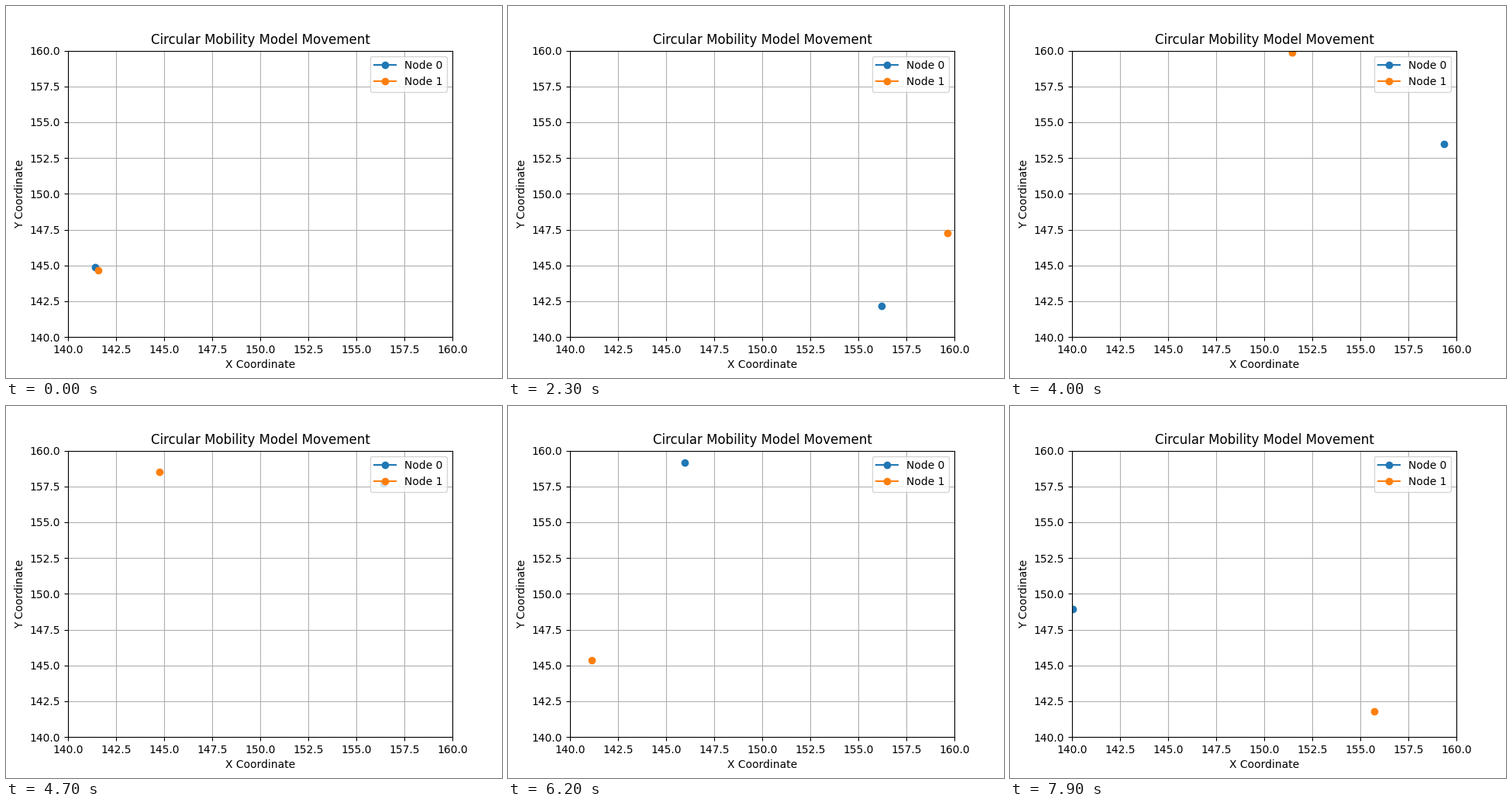
Animation of 640 by 480 pixels, one loop 8 s. Source, as a matplotlib script:

```python
import numpy as np
import matplotlib.pyplot as plt
from matplotlib.animation import FuncAnimation

FRAMES, INTERVAL = 80, 100
CENTER, RADIUS = 150, 10
START = np.radians([210.83, 212.42])
STEP = [np.radians(4.243), 0.1]  # radians per frame for each node

fig, ax = plt.subplots(figsize=(6.4, 4.8), dpi=100)
ax.set(xlim=(140, 160), ylim=(140, 160),
       xlabel="X Coordinate", ylabel="Y Coordinate",
       title="Circular Mobility Model Movement")
ax.grid(True)

nodes = [ax.plot([], [], marker="o", label=f"Node {i}")[0] for i in range(2)]
ax.legend(loc="upper right")


def update(frame):
    for node, start, step in zip(nodes, START, STEP):
        angle = start + step * frame
        node.set_data([CENTER + RADIUS * np.cos(angle)],
                      [CENTER + RADIUS * np.sin(angle)])
    return nodes


anim = FuncAnimation(fig, update, frames=FRAMES, interval=INTERVAL,
                     repeat=True, repeat_delay=0)
plt.show()
```
